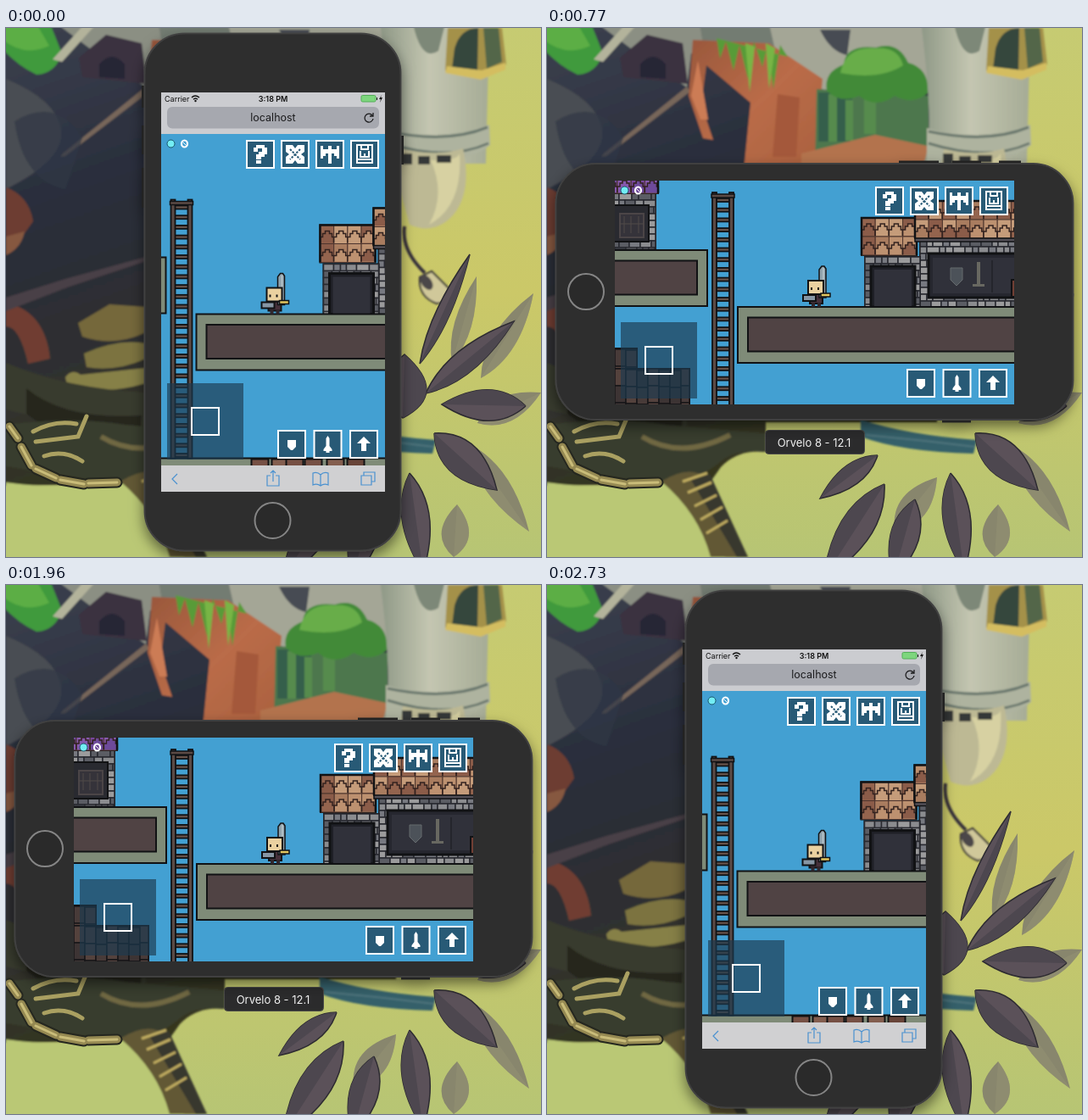
These frames come from a looping animation (631x624 px, 2800 ms). An HTML page:

```html
<!DOCTYPE html>
<html lang="en">
<head>
<meta charset="utf-8">
<title>Device rotation</title>
<style>
html,body{margin:0;width:100%;height:100%;overflow:hidden;background:#2d2d2d}
#stage{display:block}
text{font-family:Inter,Roboto,sans-serif}
</style>
</head>
<body>
<svg id="stage" width="631" height="624" viewBox="0 0 631 624">
<defs>
  <linearGradient id="meadow" x1="0" y1="0" x2="0" y2="1">
    <stop offset="0" stop-color="#c6cb72"/><stop offset=".5" stop-color="#cbc868"/><stop offset="1" stop-color="#b7c574"/>
  </linearGradient>
  <linearGradient id="night" x1="0" y1="0" x2=".3" y2="1">
    <stop offset="0" stop-color="#3d4250"/><stop offset=".4" stop-color="#292d3b"/><stop offset=".75" stop-color="#30302f"/><stop offset="1" stop-color="#35361f"/>
  </linearGradient>
  <linearGradient id="stone"><stop offset="0" stop-color="#8f9987"/><stop offset=".45" stop-color="#c4c6b1"/><stop offset="1" stop-color="#a5ab95"/></linearGradient>
  <linearGradient id="clay" x1="0" y1="0" x2="1" y2="1"><stop offset="0" stop-color="#99573c"/><stop offset=".5" stop-color="#ba6c48"/><stop offset="1" stop-color="#a9603f"/></linearGradient>
  <filter id="shade" x="-15%" y="-15%" width="130%" height="130%"><feDropShadow dx="0" dy="7" stdDeviation="8" flood-color="#000" flood-opacity=".5"/></filter>
  <filter id="soft"><feGaussianBlur stdDeviation="1.1"/></filter>
  <clipPath id="screenClip"><rect id="screenBox"/></clipPath>
  <clipPath id="viewClip"><rect id="viewBox"/></clipPath>
  <g id="world"></g>
</defs>

<g id="backdrop">
  <rect width="631" height="624" fill="url(#meadow)"/>
  <g filter="url(#soft)">
    <path d="M-9-9H460V465H258V500Q226 496 205 518L186 545 140 538 0 540-9 540z" fill="url(#night)"/>
    <path d="M0 60q60 25 65 60t-65 70z" fill="#4a4d52"/>
    <path d="M60-5H300L230 30 170 30 165 70 120 40z" fill="#8b8f83"/>
    <path d="M86 35 118 8 160 18 166 66 90 58z" fill="#3a3340"/>
    <path d="M110 58v-15q15-18 30 0v17z" fill="#262736"/>
    <path d="M-5-5H52l14 35q-8 24-30 25Q14 45-5 24z" fill="#3f9a3d"/>
    <path d="M-5-5H36l15 26q-30 14-56-8z" fill="#5cae45"/>
    <path d="M55 37 92-4l12 2-38 42z" fill="#b3b39b"/>
    <path d="M165 69 67 148l-3 4 6-1 99-76z" fill="#77665a"/>
    <path d="M0 188q27 10 32 40l-10 14L0 248z" fill="#6d3c32"/>
    <path d="M0 246l22-6q-4 20-22 28z" fill="#86583f"/>
    <path d="M0 324q46 10 52 66l-26 6Q16 352 0 352z" fill="#703d30"/>
    <path d="M0 318 70 296 165 270v5L72 306 0 334z" fill="#484047"/>
    <path d="M10 110q50-30 80 20l-20 60q-50-10-60-80z" fill="#303846" opacity=".7"/>
    <path d="M85 348 122 326l43 3v30q-38 18-75 5z" fill="#75673b"/>
    <path d="M92 384q40-18 73-12v18q-35 16-70 10z" fill="#7b733f"/>
    <path d="M70 412q8-11 18-3l77-8v18q-40 12-78 7-14 4-17-14z" fill="#868047"/>
    <path d="M0 395q70 30 165 35v40L60 465 0 450z" fill="#393b2d"/>
    <path d="M24 425q45 38 136 32l-2 28q-80 12-134-30z" fill="#25261f"/>
    <path d="M0 536q70 10 150-2l40 20 20 72H0z" fill="#bac875"/>
    <path d="M180-5H275V25H185z" fill="#737b72"/>
    <path d="M262-5H455l-5 78-118 4-60-38z" fill="#a4a696"/>
    <path d="M322 2h36l-4 30q-20-4-32-30z" fill="#474c53"/>
    <path d="M172 14 262 18 325 60 316 168H232L240 88 188 44 182 90 196 132 184 130 167 80z" fill="url(#clay)"/>
    <path d="M178 38 190 108 181 108 170 80z" fill="#cc7c55"/>
    <path d="M272 78l26 4-4 70h-28z" fill="#a4583a"/>
    <path d="M318 72l132 8v85H316z" fill="#4d774e"/>
    <path d="M320 76h40v58h-40z" fill="#365e4c"/>
    <path d="M332 78h10v56h-10zM352 85h9v48h-9zM374 80h14v45h-14z" fill="#568b4d"/>
    <path d="M300 148l87-22 66 14v25H300z" fill="#b3734e"/>
    <path d="M330 74q-4-22 20-31 2-24 38-20 26-8 38 18 24 6 24 35-18 16-40 4-22 16-42 0-22 10-38-6z" fill="#428a38"/>
    <path d="M346 53q6-32 42-29 26-2 32 20-28 18-74 9z" fill="#67ad49"/>
    <path d="M200 12l4 24 7-20 9 34 7-30 10 40 7-44 10 30 6-24 7 50 8-52 9 14z" fill="#599b39"/>
    <path d="M234 18l5 58 6-54zM258 18l4 54 7-48z" fill="#78b545"/>
    <path d="M442-5H570l-4 165H444q14-30-2-160z" fill="url(#stone)"/>
    <path d="M448 118q60 18 122-4l1 24q-24 22-123 27z" fill="#aeb39f"/>
    <path d="M450 136q70 22 119 0M450 122q70 15 118-5" fill="none" stroke="#68766c" stroke-width="3"/>
    <path d="M468 143q42 9 71-1 11 50-11 78-22 25-52 12l-14-50z" fill="#bdb994"/>
    <path d="M501 156q30 2 34-8 4 62-36 84 20-36 2-76z" fill="#d7d1a2"/>
    <path d="M467 148h12v13h-12zM486 151h14v10h-14zM508 150h17v9h-17z" fill="#343739"/>
    <path d="M480-5h38l-8 32q-20 14-30-32z" fill="#7d8878"/>
    <path d="M521 0h64l5 43-32 15-40-8z" fill="#a4914a"/>
    <path d="M529 24q7-24 28-24l-1 52-30-4z" fill="#36473d"/>
    <path d="M563 0h18l4 40-18 8z" fill="#52664a"/>
    <path d="M520 45l41 5 28-9v8l-29 12-42-8z" fill="#d4bd60"/>
    <path d="M470 234q-4 28 24 55" fill="none" stroke="#37333a" stroke-width="4"/>
    <path d="M488 294l14-7 22 22q2 13-16 16-22-8-20-31z" fill="#d0c89a" stroke="#302e35" stroke-width="2"/>
    <ellipse cx="496" cy="300" rx="6" ry="10" fill="#4b4749" transform="rotate(-35 496 300)"/>
    <path d="M0 468q80-10 140 0l118 10v22q-38-4-56 14l-30 20-40 4L0 517z" fill="#393c2d"/>
    <path d="M135 535q28-18 48-8l54 97h-44q-14-52-58-89z" fill="#625936"/>
    <path d="M168 530l24-4 45 98h-13z" fill="#39382d"/>
    <path d="M160 535l29-10M166 548l28-12M174 564l26-13M181 580l26-15M188 596l25-15" stroke="#c2ae62" stroke-width="3"/>
    <path d="M112 482q46 28 104-2" stroke="#6f6743" stroke-width="6" fill="none"/>
    <path d="M370 462q55 18 137 24l-4 16q-85-2-133-20z" fill="#35606a"/>
    <path d="M376 480l70 7 58 7" stroke="#4f747c" stroke-width="2" fill="none"/>
  </g>
  <g id="bones" fill="none" stroke-linecap="round"></g>
  <g id="leaves"></g>
</g>

<g id="label">
  <rect x="257.5" y="474.5" width="117" height="28" rx="4" fill="#2b2b2c" stroke="#4a4a48"/>
  <text x="315" y="494" font-size="13" text-anchor="middle" fill="#f2f2f2">Orvelo 8 - 12.1</text>
</g>
<g filter="url(#shade)"><g id="phone">
  <path d="M162 68v26M162 115v34M162 165v47M467 127v34" stroke="#242424" stroke-width="4"/>
  <rect x="163.5" y="6.5" width="302" height="610" rx="47" fill="#2d2d2d" stroke="#414141" stroke-width="2"/>
  <circle cx="314.5" cy="581" r="21" fill="#292929" stroke="#858585" stroke-width="2"/>
</g></g>
<g clip-path="url(#screenClip)">
  <rect width="631" height="624"/>
  <g id="view"><g clip-path="url(#viewClip)">
    <rect x="-240" y="-240" width="480" height="480" fill="#1f1f1f"/>
    <g id="bar">
      <g id="address">
        <rect x="-240" width="480" height="49.5" fill="#cbccd0"/>
        <rect x="-125" y="17" width="250" height="25.500" rx="6" fill="#a6a8af"/>
        <text y="34" font-size="12.500" text-anchor="middle" fill="#1c1c1e">localhost</text>
        <path d="M117 27a5 5 0 1 0 1 4M118 24v4h-4" fill="none" stroke="#1c1c1e" stroke-width="1.300"/>
      </g>
      <g fill="#111" font-size="9">
        <g id="carrier"><text x="-128" y="10.500">Carrier</text>
          <path d="M-96 6q4-4 9 0M-94 8.200q2.500-2.500 5 0" fill="none" stroke="#111" stroke-width="1.500"/><circle cx="-91.500" cy="10" r="1.200"/></g>
        <text y="10.500" font-weight="600" text-anchor="middle">3:18 PM</text>
        <g id="battery"><rect x="104" y="3.500" width="17" height="7.500" rx="1.500" fill="#7ed67e" stroke="#53ad58"/><path d="M122 6h1v3h-1zM128 3l-3 5h2l-1 4 3-6h-2z"/></g>
      </g>
    </g>
    <g id="games"></g>
    <g id="tools">
      <rect x="-240" width="480" height="32" fill="#d0d0d2"/>
      <g id="icons" fill="none" stroke="#4a91d0" stroke-width="1.200"></g>
    </g>
  </g></g>
</g>
</svg>
<script>
const $ = id => document.getElementById(id);
const set = (id, o) => { for (const k in o) $(id).setAttribute(k, o[k]); };
const INK = '#111214';

let seed = 7;
const rnd = () => (seed = seed * 16807 % 2147483647) / 2147483647;
const pick = a => a[Math.floor(rnd() * a.length)];
const box = (x, y, w, h, fill, line = 'none', lw = 2) =>
  `<rect x="${x}" y="${y}" width="${w}" height="${h}" fill="${fill}" stroke="${line}" stroke-width="${lw}"/>`;
const path = (d, fill, line = 'none', lw = 2) =>
  `<path d="${d}" fill="${fill}" stroke="${line}" stroke-width="${lw}"/>`;

// Backdrop details
function leaf(x1, y1, x2, y2, wide, dark) {
  const dx = x2 - x1, dy = y2 - y1, k = 1.35 * wide / Math.hypot(dx, dy);
  const mx = x1 + dx * .4, my = y1 + dy * .4;
  const d = `M${x1} ${y1}Q${mx - dy * k} ${my + dx * k} ${x2} ${y2}Q${mx + dy * k} ${my - dx * k} ${x1} ${y1}`;
  const half = `M${x1} ${y1}Q${mx - dy * k} ${my + dx * k} ${x2} ${y2}z`;
  return dark ? path(d, '#5b5159', '#2d2b31', 1.5) + path(half, '#4d474f') : path(d, '#88866d') + path(half, '#95937580');
}
$('leaves').innerHTML =
  leaf(526, 395, 555, 293, 15) + leaf(560, 413, 622, 313, 20) + leaf(556, 466, 631, 430, 22) +
  leaf(545, 490, 617, 594, 21) + leaf(528, 624, 532, 562, 24) + leaf(410, 592, 460, 530, 24) +
  leaf(488, 396, 547, 267, 12, 1) + leaf(495, 431, 599, 346, 20, 1) + leaf(613, 446, 514, 444, 27, 1) +
  leaf(505, 478, 579, 545, 30, 1) + leaf(476, 525, 492, 642, 24, 1) + leaf(390, 504, 322, 555, 18, 1) +
  leaf(398, 538, 326, 650, 28, 1) + leaf(434, 556, 408, 650, 25, 1) + leaf(468, 460, 470, 385, 40, 1);

const bone = d => `<path d="${d}" stroke="#25271f" stroke-width="13"/><path d="${d}" stroke="#958952" stroke-width="9"/><path d="${d}" stroke="#c9bc79" stroke-width="3"/>`;
$('bones').innerHTML = bone('M4 470l10 14M18 494l12 22M35 520l24 11M64 533l28 5M97 537l34-1') +
  `<path d="M32 476q25-14 51-9M35 488l50-6 10-24M45 505q23-8 45 6" stroke="#aaa061" stroke-width="5"/>`;

// Game world
const BROWN = ['#94644e', '#a97c5f', '#bd9170', '#8b5c49', '#c59c7a'];
const PURPLE = ['#6e4a9a', '#8659ad', '#77479c'];
function roof(x, y, w, h, tones) {
  let s = box(x, y, w, h, tones[0], INK);
  for (let r = 0; r < h; r += 22) for (let c = 0; c < w; c += 16.2) {
    const a = x + c, b = y + r, th = Math.min(22, h - r), tw = Math.min(16.2, w - c);
    if (tw < 3) continue;
    s += box(a, b, tw, th, pick(tones), '#4d342d', 1);
    if (tw > 15) s += path(`M${a} ${b + th - 1}v-7h3v-4h3v-3h5v3h3v4h2v7`, pick(tones), '#33221f', 1.5);
  }
  return s + path(`M${x} ${y + h}V${y}H${x + w}V${y + h}`, 'none', INK, 2.5);
}
function wall(x, y, w, h) {
  let s = box(x, y, w, h, '#42434a', INK);
  for (let r = 0; r < h; r += 8) for (let c = 0; c < w;) {
    const bw = Math.min(7 + Math.floor(rnd() * 9), w - c);
    s += box(x + c, y + r, bw, Math.min(8, h - r), pick(['#8b8c8f', '#777980', '#5b5d64', '#9b9b9c']), '#292a30', 1.5);
    c += bw;
  }
  return s;
}
function slab(x, y, w) {
  return box(x, y, w, 66, '#7f8b78', INK) + box(x + 12, y + 12.500, w - 24, 40, '#504344', INK);
}
function ladder(x, y, h) {
  let s = '';
  for (let r = y + 7; r < y + h; r += 11.7) s += box(x + 4, r, 18, 4, '#68534a', INK, 1.8);
  return s + box(x, y, 5, h, '#5b4a45', INK, 1.8) + box(x + 20, y, 5, h, '#5b4a45', INK, 1.8) + box(x - 1, y + 2, 27, 4, '#5b4a45', INK, 1.5);
}
function planks(x, y, w, h) {
  let s = box(x, y, w, h, '#312a2b', INK);
  for (let r = 0; r < h; r += 20) for (let c = 0; c < w; c += 13)
    s += box(x + c, y + r + c % 3, Math.min(13, w - c), Math.min(20, h - r), pick(['#483b39', '#3d3434', '#54423d']), '#171618', 1.5);
  return s;
}
const knight =
  box(310, 314, 15, 11, '#46303a', INK) + box(312, 324, 4, 5, '#30272d') + box(319, 324, 4, 5, '#30272d') +
  path('M321 318V285l3-4h3l2 3v34z', '#91a3ad', INK, 1.5) + path('M326 283v32', 'none', '#b8c7cc', 1.5) +
  box(308, 298, 18, 16, '#ead1a0', INK) + box(311, 306, 2, 3, INK) + box(319, 306, 2, 3, INK) +
  box(302, 315, 15, 7, '#8796a4', INK) + box(323, 313, 11, 4, '#e2c65f', INK, 1.5);
const ground = [290, 314, 331, 353, 379, 403].map(x => box(x, 500, 20, 22, pick(['#765044', '#684439', '#835e4f']), INK)).join('');

$('world').innerHTML =
  wall(0, 195, 128, 66) + box(0, 209, 120, 43, '#292a30', INK) + box(86, 219, 28, 28, '#35333a', '#4b4547') +
  path('M91 222v20M99 222v20M108 222v20M86 231h28', 'none', '#504a49', 1) +
  roof(2, 151, 129, 44, PURPLE) + slab(-60, 262, 249) +
  planks(28, 378, 78, 122) + planks(80, 402, 88, 98) +
  box(-100, 499, 900, 60, '#7f8b78', INK) + ground +
  ladder(195, 194, 305) +
  wall(440, 250, 240, 79) + box(450, 266, 240, 52, '#26272f', INK, 3) + box(455, 271, 240, 42, '#30313a') +
  path('M476 283h14v14l-7 7-7-7z', '#4c5259', '#656a6d', 1) +
  path('M507 276h4v26h-4zM502 302h14v3h-14z', '#686861') + box(548, 297, 25, 20, '#713f34', INK) +
  path('M525 274v38', 'none', '#24252c', 2) +
  wall(375, 270, 65, 59) + box(382, 281, 52, 48, '#1f2027', INK, 3) + box(386, 285, 44, 44, '#30313a') +
  roof(371, 224, 65, 44, BROWN) + roof(434, 204, 250, 44, BROWN) +
  box(434, 248, 250, 4, '#535057', INK, 1.5) +
  slab(225, 329, 500) + knight;

// Game overlay, anchored to the corners of its area
const W = '#fff', NAVY = '#285a76';
const GLYPHS = [
  path('M9 9h3v-3h10v3h3v8h-3v3h-4v3h-6v-6h3v-3h4v-4h-5v4h-5zM12 24h6v4h-6z', W),
  path('M6 6h8l3 4 3-4h8v8l-4 3 4 3v8h-8l-3-4-3 4h-8v-8l4-3-4-3z', W) +
    `<path d="M11 11l12 12M23 11l-12 12" stroke="${NAVY}" stroke-width="2" stroke-dasharray="2.500 1.500"/>`,
  path('M15 7h4v21h-4zM6 7h3v4h6v5h-3v3h-3v3h-3zM28 7h-3v4h-6v5h3v3h3v3h3z', W),
  path('M8 6h18v21h-18zM13 7v4h8v-4M12 13v7h10v-7M17 16v4M8 23h18', 'none', W, 2),
  path('M12 12h10v8l-4 4h-2l-4-4z', W),
  path('M15 10l2-3 2 3v9l3 4v2h-3v2h-4v-2h-3v-2l3-4z', W),
  path('M17 8l8 8h-5v9h-6v-9h-5z', W)
];
function button(x, y, i) {
  return `<g transform="translate(${x} ${y})">${box(1, 1, 32, 32, NAVY, W)}${GLYPHS[i]}</g>`;
}
function game(id, w, h) {
  let s = '';
  for (let i = 0; i < 4; i++) s += button(w - 164 + i * 41, 7, i);
  for (let i = 0; i < 3; i++) s += button(w - 127 + i * 42.500, h - 42, 4 + i);
  return `<svg id="${id}" width="${w}" height="${h}" overflow="hidden">${box(0, 0, w, h, '#43a0d2')}
    <use id="${id}World" href="#world"/>
    <circle cx="11.500" cy="11.500" r="4.500" fill="#73edf4" stroke="#19566a"/>
    <ellipse cx="27.500" cy="11.500" rx="3.500" ry="4" fill="none" stroke="#fff" stroke-width="2.200"/>
    <path d="M25.500 9.500l4 4" stroke="#fff"/>
    <rect x="7" y="${h - 97}" width="90" height="90" fill="#1c3a50" opacity=".66"/>
    ${box(36, h - 68, 32, 32, 'none', W)}${s}</svg>`;
}
$('games').innerHTML = `<g id="fit">${game('land', 471, 264)}${game('port', 264, 391)}</g>`;

// Browser toolbar icons: x offset, drawing
const TOOLS = [
  [-116, 'M3-6l-6 6 6 6'],
  [0, 'M-3-4h-4v12h14v-12h-4M0 3v-13M-3-7l3-3 3 3'],
  [56, 'M0-5q-4-4-9-2v14q5-2 9 1 4-3 9-1v-14q-5-2-9 2v13'],
  [112, 'M-8-4h12v11h-12zM-5-4v-4h13v11h-4']
];
$('icons').innerHTML = TOOLS.map(t => `<path d="${t[1]}"/>`).join('');

const SNAP_A = 350, TURN_A = 405, SNAP_B = 2100, TURN_B = 2160, TURN = 350, LOOP = 2800, STEP = 70;
const ease = x => (1 - Math.cos(Math.PI * Math.min(1, Math.max(0, x)))) / 2;

function draw(t) {
  const wide = t >= SNAP_A && t < SNAP_B;
  let tall = 1, turn = 0, layout = 'port', lag = 0;
  if (wide) {
    const p = ease((t - TURN_A) / TURN);
    tall = 1 - p;
    turn = 90 * (1 - p);
    if (t >= TURN_A) { layout = 'land'; lag = -Math.exp((SNAP_A - t) / 95); }
  } else if (t >= SNAP_B) {
    const p = ease((t - TURN_B) / TURN);
    turn = -90 * (1 - p);
    if (t >= TURN_B) { tall = p; lag = Math.exp((SNAP_B - t) / 98); }
    else { tall = 0; layout = 'land'; }
  }
  if (Math.abs(lag) < .02) lag = 0;
  const land = layout === 'land';
  const vw = 471 - 207 * tall, vh = 264 + 207 * tall;
  const gw = land ? 471 : 264, gh = land ? 264 : 391;

  set('phone', { transform: wide ? 'rotate(90 315.2 311.8)' : '' });
  set('label', { visibility: wide ? 'visible' : 'hidden' });
  set('screenBox', wide ? { x: 80, y: 180, width: 471, height: 264 } : { x: 183, y: 76, width: 264, height: 471 });
  set('view', { transform: `translate(${wide ? '315.5 312' : '315 311.5'}) rotate(${turn})` });
  set('viewBox', { x: -vw / 2, y: -vh / 2, width: vw, height: vh });

  set('bar', { transform: `translate(0 ${-vh / 2 - (land ? 0 : 49 * (1 - tall))})` });
  set('address', { visibility: land ? 'hidden' : 'visible' });
  set('carrier', { transform: `translate(${132 - vw / 2})`, visibility: land ? 'hidden' : 'visible' });
  set('battery', { transform: `translate(${vw / 2 - 132})` });

  set('fit', { transform: `translate(${-vw / 2} ${-vh / 2 + 49 * tall}) scale(${vw / gw})` });
  set('land', { display: land ? 'inline' : 'none' });
  set('port', { display: land ? 'none' : 'inline' });
  set(layout + 'World', { transform: `translate(${gw / 2 - 315.5 + 103.5 * lag} ${gh / 2 - 312 - 63.5 * lag})` });

  set('tools', { transform: `translate(0 ${vh / 2 - 31 * tall})` });
  TOOLS.forEach((o, i) => $('icons').children[i].setAttribute('transform', `translate(${o[0] * vw / 264} 16)`));
}

const start = performance.now();
function tick() {
  const t = (performance.now() - start) % LOOP;
  draw(Math.floor(t / STEP) * STEP);
  requestAnimationFrame(tick);
}
draw(0);
requestAnimationFrame(tick);
</script>
</body>
</html>
```
